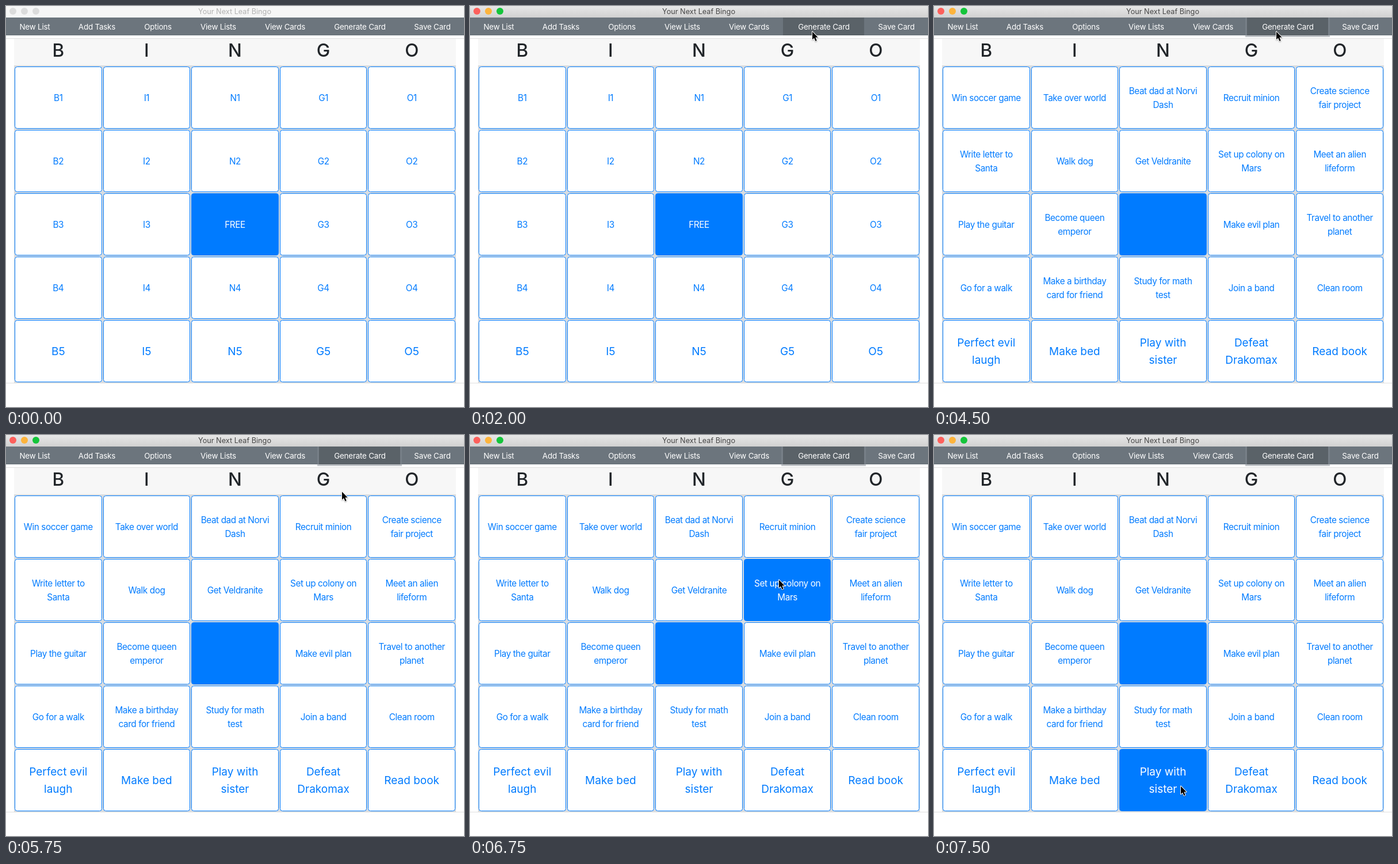
Write an HTML page with a canvas that moves like this. It is 796x696 px and loops after 8000 ms.

```html
<!DOCTYPE html>
<html lang="en">
<head>
<meta charset="utf-8">
<title>Bingo</title>
<style>
  html, body { margin: 0; width: 100%; height: 100%; overflow: hidden; background: #fff; }
  canvas { display: block; }
</style>
</head>
<body>
<canvas id="stage" width="796" height="696"></canvas>
<script>
const ctx = document.getElementById('stage').getContext('2d');
const LOOP = 8000;
const BLUE = [0, 123, 255];
const WHITE = [255, 255, 255];

const NAV = [
  ['New List', 50], ['Add Tasks', 158], ['Options', 264], ['View Lists', 369],
  ['View Cards', 485], ['Generate Card', 615], ['Save Card', 741]
];

const TASKS = [
  ['Win soccer game', 'Take over world', 'Beat dad at Norvi|Dash', 'Recruit minion', 'Create science|fair project'],
  ['Write letter to|Santa', 'Walk dog', 'Get Veldranite', 'Set up colony on|Mars', 'Meet an alien|lifeform'],
  ['Play the guitar', 'Become queen|emperor', '', 'Make evil plan', 'Travel to another|planet'],
  ['Go for a walk', 'Make a birthday|card for friend', 'Study for math|test', 'Join a band', 'Clean room'],
  ['Perfect evil|laugh', 'Make bed', 'Play with|sister', 'Defeat|Drakomax', 'Read book']
];

const POINTER = [
  [750, 587, 8], [1000, 588, 27], [1250, 590, 33], [1750, 591, 37], [2000, 594, 43],
  [5500, 586, 64], [5750, 583, 97], [6000, 567, 142], [6250, 557, 178], [6500, 552, 188],
  [6750, 536, 250], [7000, 432, 605], [7250, 430, 603], [7500, 428, 608]
];

// Hovered cells: [start ms, end ms, column, row, strength]
const HOVERS = [
  [6000, 6750, 3, 0, 1], [6750, 7000, 3, 1, 1],
  [7000, 7250, 2, 4, 0.235], [7250, LOOP, 2, 4, 1]
];

const mix = (a, b, k) => `rgb(${a.map((v, i) => Math.round(v + (b[i] - v) * k))})`;

function rect(x, y, w, h, color) {
  ctx.fillStyle = color;
  ctx.fillRect(x, y, w, h);
}

function label(text, x, middle, size, color, spacing = 0, weight = 400) {
  ctx.font = `${weight} ${size}px Inter, "Liberation Sans", sans-serif`;
  ctx.letterSpacing = spacing + 'px';
  ctx.textAlign = 'center';
  ctx.fillStyle = color;
  ctx.fillText(text, x, Math.round(middle + size * 0.364));
}

function titleBar(active) {
  const shade = ctx.createLinearGradient(0, 0, 0, 20);
  shade.addColorStop(0, active ? '#e7e7e7' : '#f6f6f6');
  shade.addColorStop(1, active ? '#d1d1d1' : '#f6f6f6');
  rect(0, 0, 796, 20, shade);
  const lights = active ? ['#fc605c', '#fdb43c', '#14c53a'] : ['#dcdcdc', '#dcdcdc', '#dcdcdc'];
  lights.forEach((color, i) => {
    ctx.fillStyle = color;
    ctx.beginPath();
    ctx.arc(12 + 20 * i, 9, 6, 0, Math.PI * 2);
    ctx.fill();
  });
  label('Your Next Leaf Bingo', 397.5, 9.5, 12.7, active ? '#464646' : '#b2b2b2');
}

function navBar(hovered, focused) {
  rect(0, 20, 796, 31, '#6c757d');
  if (focused) rect(541, 20, 147, 34, 'rgba(130,138,145,0.5)');
  if (hovered) rect(544, 20, 141, 31, '#5a6268');
  for (const [text, x] of NAV) label(text, x, 36, 13.4, '#fff', -0.2);
}

function cell(col, row, text, filled) {
  const x = Math.round(15 + 153.5 * col);
  const right = Math.round(166.6 + 153.6 * col);
  const y = 105 + 110 * row;
  ctx.beginPath();
  ctx.roundRect(x + 0.5, y + 0.5, right - x - 1, 107, 4);
  ctx.fillStyle = mix(WHITE, BLUE, filled);
  ctx.fill();
  ctx.lineWidth = 1;
  ctx.strokeStyle = mix(BLUE, BLUE, 0);
  ctx.stroke();

  const large = row === 4;
  const lines = text.split('|');
  const step = large ? 30 : 24;
  lines.forEach((line, i) => {
    const middle = y + 54 + (i - (lines.length - 1) / 2) * step;
    label(line, 90.8 + 153.6 * col, middle, large ? 19 : 15.3,
      mix(BLUE, WHITE, filled), large ? 0 : -0.4);
  });
}

function board(t) {
  rect(0, 56, 796, 1, '#dfdfdf');
  rect(14, 57, 768, 47, '#f7f7f7');
  rect(14, 103, 768, 551, '#dadde0');
  rect(0, 654, 796, 1, '#dfdfdf');
  [...'BINGO'].forEach((letter, col) => {
    label(letter, 90.8 + 153.6 * col, 77, 31.5, '#212529', 0, 500);
    for (let row = 0; row < 5; row++) {
      const free = col === 2 && row === 2;
      const hover = HOVERS.find(h => t >= h[0] && t < h[1] && h[2] === col && h[3] === row);
      const blank = free ? 'FREE' : letter + (row + 1);
      cell(col, row, t < 3250 ? blank : TASKS[row][col], free ? 1 : hover ? hover[4] : 0);
    }
  });
}

function pointer(t) {
  const spot = POINTER.filter(p => t >= p[0]).pop();
  if (!spot) return;
  ctx.save();
  ctx.translate(spot[1] + 1, spot[2] + 1.5);
  ctx.beginPath();
  [[0, 0], [0, 13.8], [3.1, 10.9], [5.5, 16.4], [7.7, 15.4], [5.4, 10.1], [9.7, 10.1]]
    .forEach(([x, y]) => ctx.lineTo(x, y));
  ctx.closePath();
  ctx.lineJoin = 'round';
  ctx.lineWidth = 2;
  ctx.strokeStyle = '#fff';
  ctx.shadowColor = 'rgba(0,0,0,0.3)';
  ctx.shadowBlur = 2;
  ctx.shadowOffsetY = 1;
  ctx.stroke();
  ctx.shadowColor = 'transparent';
  ctx.fillStyle = '#000';
  ctx.fill();
  ctx.restore();
}

function draw(now) {
  const t = now % LOOP;
  rect(0, 0, 796, 696, '#fff');
  titleBar(t >= 1500);
  navBar(t >= 1750, t >= 3250);
  board(t);
  pointer(t);
}

const start = performance.now();
function tick() {
  draw(performance.now() - start);
  requestAnimationFrame(tick);
}
tick();
</script>
</body>
</html>
```
